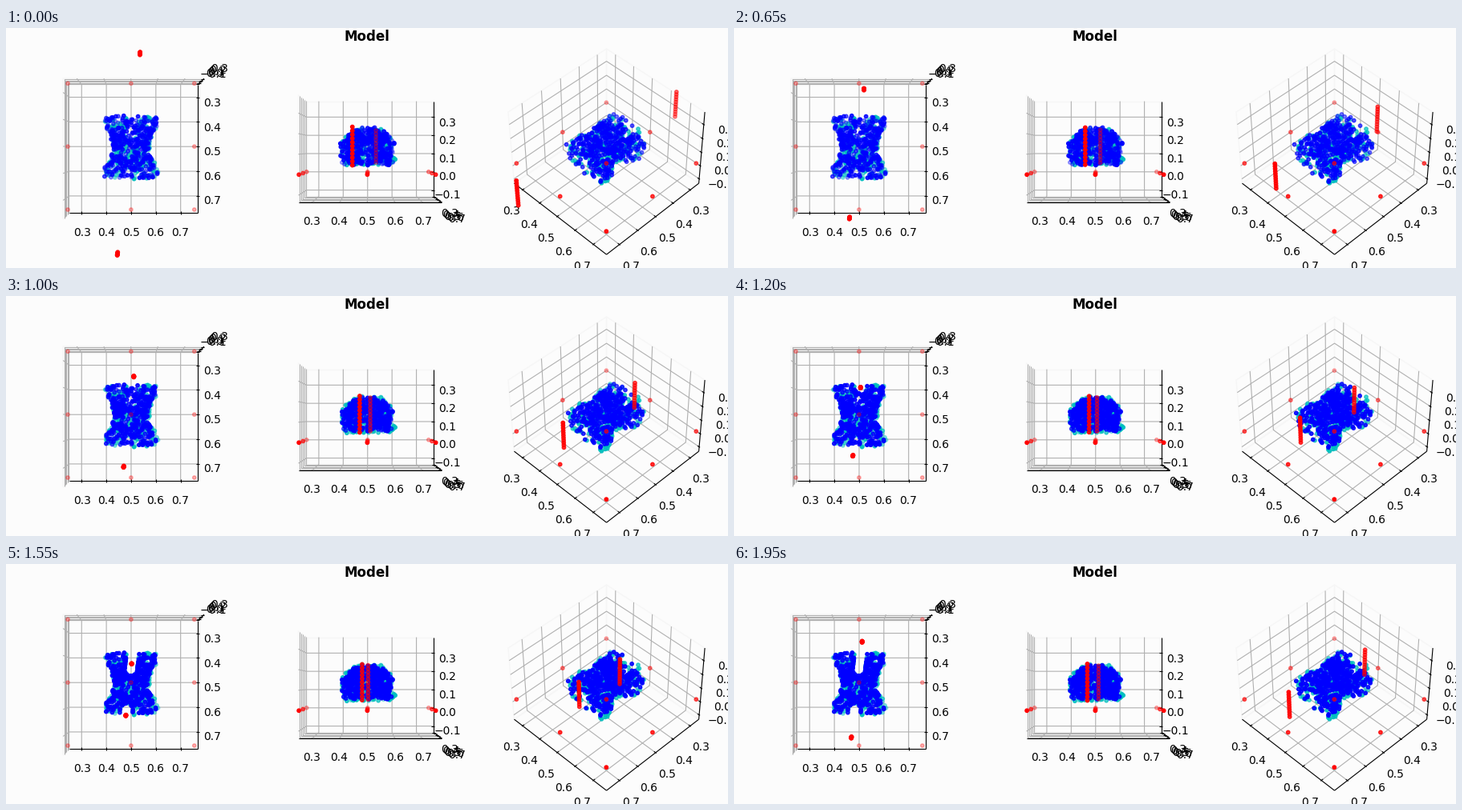
Write a matplotlib script that moves like this. It is 900 px wide and 300 px high and loops after 2 s.

```python
import numpy as np
import matplotlib.pyplot as plt
from matplotlib.animation import FuncAnimation

FRAMES, CLOSING = 40, 29
MID = np.array([0.51, 0.509, 0.1262])       # centre of the plotted box
SCALE = np.array([2.2858, -2.2858, 1.7143])  # y axis is inverted
HALF = 0.26042
LO, HI = MID - HALF, MID + HALF
FOCAL, DIST, CY = 1410, 10, 151
VIEWS = [(159.05, 90, -90), (453.8, 0, -90), (748.55, 45, -45)]

rng = np.random.default_rng(7)


def project(points, view):
    """Pixel position and nearness of data points in one view."""
    cx, elev, azim = view
    e, a = np.radians([elev, azim])
    p = (np.atleast_2d(points) - MID) * SCALE
    right = [-np.sin(a), np.cos(a), 0]
    up = [-np.sin(e) * np.cos(a), -np.sin(e) * np.sin(a), np.cos(e)]
    near = [np.cos(e) * np.cos(a), np.cos(e) * np.sin(a), np.sin(e)]
    depth = p @ near
    k = FOCAL / (DIST - depth)
    return np.column_stack([cx + k * (p @ right), CY - k * (p @ up)]), depth


def clay(n, middle):
    """Block with a waist on both sides and a domed top."""
    u, v = rng.uniform(-1, 1, (2, n))
    u = np.sign(u) * np.abs(u) ** 0.8
    flare = np.minimum(1, 1.4 * np.abs(v)) ** 1.5
    x = u * (0.068 + 0.035 * flare)
    top = 0.197 * (1 - 0.33 * np.abs(x / 0.1) ** 2.5) * (1 - 0.08 * v ** 2)
    z = 0.043 + top * rng.uniform(0, 1, n)
    y = 0.503 + (0.121 - 0.006 * u ** 4) * v
    return np.column_stack([middle + x, y, z])


def fingers(i):
    """Ground position of the two gripper fingers."""
    steps = min(i, 2 * CLOSING - i)
    reach = np.array([0.0434, -0.387]) * (1 - 0.0275 * steps)
    centre = np.array([0.4913, 0.5276])
    return centre + reach, centre - reach


def push(points, i, radius=0.025):
    for g in fingers(i):
        d = points[:, :2] - g
        r = np.hypot(*d.T)[:, None] + 1e-9
        points[:, :2] += np.where(r < radius, d / r * (radius - r), 0)


def ramp(i, start, end):
    return np.clip((i - start) / (end - start), 0, 1)


def roll_out(points):
    settle = (np.array([0.5, 0.505, 0.14]) - points) * [0.06, 0.03, 0.1]
    states = []
    for i in range(FRAMES):
        points = points + settle * (ramp(i, 14, 20) - ramp(i - 1, 14, 20))
        push(points, i)
        states.append(points)
    return states


def tool(i):
    heights = 0.139 + 0.018 * np.arange(-5, 6)
    floor = [(x, y, 0) for x in (0.25, 0.5, 0.75) for y in (0.25, 0.5, 0.75)]
    sticks = [(*g, z) for g in fingers(i) for z in heights]
    return np.array(floor + sticks)


fig = plt.figure(figsize=(9, 3), dpi=100, facecolor="#fcfcfc")
ax = fig.add_axes([0, 0, 1, 1])
ax.set(xlim=(0, 900), ylim=(300, 0))
ax.axis("off")
ax.text(450, 15.7, "Model", size=12, weight="bold", ha="center", va="baseline")


def line(points, view, color, width=0.8, z=1.0):
    xy, _ = project(points, view)
    ax.plot(*xy.T, color=color, lw=width, zorder=z, solid_capstyle="butt")


def draw_box(view):
    x0, y0, z0 = LO
    x1, y1, z1 = HI
    panes = [
        [(x0, y0, z0), (x0, y1, z0), (x0, y1, z1), (x0, y0, z1)],
        [(x0, y0, z0), (x1, y0, z0), (x1, y0, z1), (x0, y0, z1)],
        [(x0, y0, z0), (x1, y0, z0), (x1, y1, z0), (x0, y1, z0)],
    ]
    for pane in panes:
        line(pane + pane[:1], view, "#f6f6f6", 1, 0.5)

    ground = np.arange(3, 8) / 10
    axes = [
        # ticks, grid path, axis line, tick direction, label direction
        (ground, lambda t: [(t, y1, z0), (t, y0, z0), (t, y0, z1)],
         [(x0, y1, z0), (x1, y1, z0)], (0, 1, 0), (0, 1, -1)),
        (ground, lambda t: [(x1, t, z0), (x0, t, z0), (x0, t, z1)],
         [(x1, y0, z0), (x1, y1, z0)], (1, 0, 0), (1, 0, -1)),
        (np.arange(-1, 4) / 10, lambda t: [(x0, y1, t), (x0, y0, t), (x1, y0, t)],
         [(x1, y0, z0), (x1, y0, z1)], (1, 0, 0), (1, -1, 0)),
    ]
    for dim, (ticks, grid, edge, out, away) in enumerate(axes):
        line(edge, view, "black", z=1.5)
        for t in ticks:
            line(grid(t), view, "#b0b0b0")
            at = np.array(edge[0])
            at[dim] = t
            out = np.array(out)
            line([at + 0.0043 * out, at - 0.0087 * out], view, "black", z=1.6)
            (pos,), _ = project(at + 0.0612 * np.array(away), view)
            ax.text(*pos, f"{t:.1f}".replace("-", "\u2212"), size=10,
                    ha="center", va="top", zorder=1.7)


def shade(dots, points, view, rgb, low=0.3):
    """Place dots back to front, the far ones more transparent."""
    xy, depth = project(points, view)
    order = np.argsort(depth)
    d = depth[order]
    rgba = np.empty((len(d), 4))
    rgba[:, :3] = rgb
    rgba[:, 3] = low + (1 - low) * (d - d[0]) / (d[-1] - d[0])
    dots.set_offsets(xy[order])
    dots.set_color(rgba)
    return d[-1]


def make_dots(z):
    return ax.scatter([], [], s=10, linewidths=1, zorder=z)


CYAN, BLUE, RED = (0, 0.75, 0.75), (0, 0, 1), (1, 0, 0)
goal = clay(300, 0.503)
for step in range(CLOSING + 1):
    push(goal, step)
states = roll_out(clay(430, 0.499))

layers = []
for view in VIEWS:
    draw_box(view)
    shade(make_dots(3), goal, view, CYAN)
    layers.append((view, make_dots(4), make_dots(5)))


def update(i):
    changed = []
    for view, body, grip in layers:
        body_near = shade(body, states[i], view, BLUE, 0.3 + 0.5 * ramp(i, 14, 27))
        grip_near = shade(grip, tool(i), view, RED)
        grip.set_zorder(5 if grip_near > body_near else 3.5)
        changed += [body, grip]
    return changed


anim = FuncAnimation(fig, update, frames=FRAMES, interval=50, repeat=True,
                     repeat_delay=0, blit=False)
plt.show()
```
